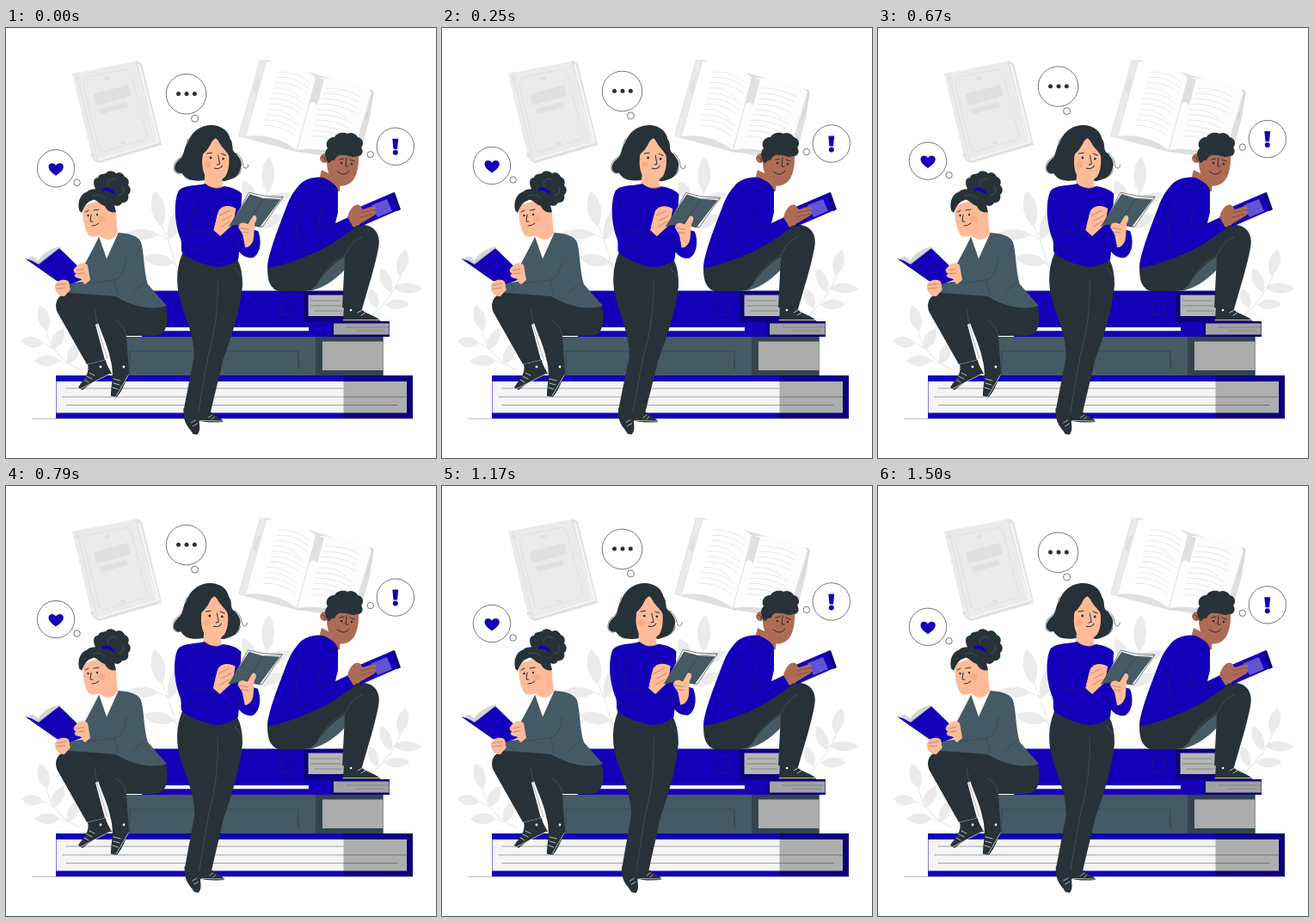
Recreate the animation shown at these times as an HTML page. Size 500 by 500 pixels, loop 1.54 s.

```html
<!DOCTYPE html>
<html lang="en">
<head>
<meta charset="utf-8">
<title>Readers</title>
<style>
html, body { margin: 0; width: 100%; height: 100%; overflow: hidden; background: #fff; }
svg { display: block; width: 100vw; height: 100vh; }
.blue { fill: #1400b8; }
.navy { fill: #0d007c; }
.dark { fill: #263238; }
.slate { fill: #455a64; }
.skin { fill: #ffbb98; }
.brown { fill: #ae6c55; }
.pale { fill: #ebebeb; }
.grey { fill: #e0e0e0; }
.line { fill: none; stroke: #263238; stroke-width: .6; stroke-linecap: round; stroke-linejoin: round; }
.face { fill: none; stroke: #263238; stroke-width: 1; stroke-linecap: round; }
.seam { fill: none; stroke: #56686f; stroke-width: .5; }
.lace { fill: none; stroke: #fff; stroke-width: .9; stroke-linecap: round; }
.rule { fill: none; stroke: #e3e3e3; stroke-width: .8; }
.bubble circle { fill: #fff; stroke: #263238; stroke-width: .65; }
</style>
</head>
<body>
<svg viewBox="0 0 500 500">
  <defs><path id="leaf" d="M0,0C-.62,-.3 -.55,-.75 0,-1C.55,-.75 .62,-.3 0,0Z"/></defs>
  <g id="plants" class="pale"></g>

  <!-- closed book -->
  <path fill="#f4f4f4" d="M77,53L153,38L158,42L181,136L108,157L101,153Z"/>
  <path class="grey" d="M150,39L153,38L158,42L181,136L108,157L102,154L176,134Z"/>
  <path fill="#f6f6f6" d="M153,42L156,43L179,133L109,154L106,153L176,133Z"/>
  <path class="pale" d="M77,53L150,39L174,133L101,154Z"/>
  <path fill="none" stroke="#dcdcdc" stroke-width=".8" d="M82,52L106,153M92,60Q92,57 95,57L141,48Q144,51 146,55L164,125Q164,129 161,130L113,144Q109,142 108,139L90,65Z"/>
  <path class="grey" d="M102,77L142,66L145,79L105,90ZM109,94L140,86L142,92L111,100ZM114,58L120,56L121,60L115,61ZM133,133L138,131L139,135L134,136ZM81,57L85,56L86,60L82,61ZM98,147L102,146L103,150L99,150Z"/>

  <!-- open book -->
  <path class="grey" d="M295,37L303,37L427,73L424,100L410,154L338,144L270,126Z"/>
  <path class="pale" d="M296,37L302,38L278,128L271,126Z"/>
  <path fill="#fff" d="M303,39C326,38 347,46 361,58L338,142C322,129 300,123 279,126Z"/>
  <path fill="#fdfdfd" d="M361,58C382,58 409,63 425,74L402,151C382,143 359,138 338,142Z"/>
  <path fill="none" stroke="#d6d6d6" stroke-width=".8" d="M361,58L338,142M338,144C360,140 381,145 402,152"/>
  <path class="grey" d="M360,57L370,60L362,90L358,86L352,88ZM291,60L296,55L291,77L287,73Z"/>
  <path fill="none" stroke="#cfcfd8" stroke-width="1.2" d="M424,72L427,75L424,90L418,108"/>
  <g id="rules" class="rule"></g>

  <!-- stack of books -->
  <path class="line" stroke-opacity=".6" d="M31,454.3H473"/>
  <path class="blue" d="M58,404H473V454H58Z"/>
  <path fill="#f5f5f5" d="M58.5,411H466V447.5H58.5Z"/>
  <path class="line" d="M70,419H392M66,429H466M70,438.5H455" stroke-opacity=".7"/>
  <path fill-opacity=".29" d="M392.500,404H473V454H392.500Z"/>
  <path class="navy" d="M466,404H473V454H466Z"/>
  <path class="slate" d="M138,359H438.500V404H138Z"/>
  <path fill="#34444c" d="M360,359H438.500V404H360Z"/>
  <path fill="#acacac" d="M368,364.500H438.500V398H368Z"/>
  <path class="line" d="M144,376H340V396M340,385V396M144,376V403" stroke-opacity=".75"/>
  <path class="blue" d="M158,341H378V359H158Z"/>
  <path fill="#f0f0f5" d="M184,348H352V352.300H184Z"/>
  <path class="navy" d="M378,341H446V359H378ZM158,341H378V342H158Z"/>
  <path fill="#a2a2a5" d="M381,343.500H445.500V356.500H381Z"/>
  <path class="line" d="M396,348H445M408,352H440" stroke-opacity=".45"/>
  <path class="blue" d="M170,305.500H346V341H170Z"/>
  <path class="navy" d="M346,305.500H396V341H346Z"/>
  <path fill="#b5b5b5" d="M351.500,310.500H396V335H351.500Z"/>
  <path class="line" d="M355,317H388M355,323H390M359,329H390M319.500,314H333V333.500H319.500Z" stroke-opacity=".6"/>
  <path class="line" d="M187,313V341M346,306V341" stroke-opacity=".5"/>

  <!-- man -->
  <g>
    <path class="slate" d="M352,304L366,281L398,256L394,281Q374,302 352,306Z"/>
    <path class="dark" d="M304,277L352,264C372,242 398,226 417,229C431,231 436,243 433,256C429,278 421,302 414,327L391,325L394,266C381,273 371,284 363,296Q357,306 345,306H317C305,302 304,290 304,277Z"/>
    <path class="seam" d="M394,266C397,256 405,246 414,243M363,296Q372,276 394,264"/>
    <path class="dark" d="M393,322L412,325C416,333 432,334 436,341.500H392Z"/>
    <path class="lace" d="M409,331L414,328M413,334L418,331M392,339.500H434" stroke-opacity=".75"/>
    <circle cx="401" cy="328" r="1.300" fill="#fff"/>
    <path class="brown" d="M367,165L389,176L388,190Q374,190 364,176Z"/>
    <path class="blue" d="M339,185C346,175 360,172 369,174C376,177 383,181 386,188V214L383,227L400,219L406,232C389,245 372,256 357,262C339,270 319,277 304,279C304,264 318,229 328,203Q332,193 339,185Z"/>
    <path class="line" d="M346,202C338,219 335,243 340,255Q343,263 354,261M383,227C374,231 367,234 362,236L366,211M386,190Q377,190 368,176" stroke-opacity=".65"/>
    <path class="brown" d="M376,147C371,144 365,147 365,152C366,157 371,158 373,156C373,166 377,178 385,183C392,185 402,182 406,173C410,164 411,152 409,143L386,136Z"/>
    <path class="dark" d="M375,157C370,151 370,143 374,140C370,133 376,126 382,127C385,121 393,121 397,123C402,120 408,124 409,127C415,128 417,135 413,139C417,144 413,150 408,149C402,152 397,147 392,148C387,146 384,150 382,154Q379,152 376,157Z"/>
    <path class="face" d="M388,153L393,152M400,153L405,155M385,167Q394,174 399,166M396,151L395,161L398,161" stroke-width=".9"/>
    <path class="face" d="M368,150Q372,151 371,155" stroke-width=".5"/>
    <circle class="dark" cx="390" cy="157" r="1.300"/><circle class="dark" cx="402" cy="158" r="1.300"/>
    <path class="blue" d="M402,212L451,191L458,211L412,231Z"/>
    <path class="navy" d="M448,193L452,191L459,211L455,213Z"/>
    <path fill="#6254d2" d="M425,206L443,199L449,213L432,220Z"/>
    <path class="brown" d="M397,220C400,210 405,204 411,206L415,211L427,207C432,208 430,211 426,212C433,212 431,217 425,220C417,225 409,229 404,232Z"/>
    <path class="line" d="M412,215L426,212M412,220L427,216" stroke-opacity=".6"/>
  </g>

  <!-- seated girl -->
  <g>
    <path class="dark" d="M80,305C63,307 54,317 60,331L94,391L115,386L104,345L131,331L128,309Z"/>
    <path class="dark" d="M103,327C102,313 115,309 130,312L181,317C189,326 190,344 183,354Q180,358 170,358H140L142,387L122,388C118,365 106,347 103,327Z"/>
    <path class="seam" d="M103,327L107,350L118,385M128,340Q139,348 140,358"/>
    <path class="dark" d="M95,391L116,386C117,393 121,397 123,402C111,406 100,412 89,421L84,418C88,411 98,403 95,391Z"/>
    <path class="dark" d="M122,387L142,385L143,401C139,412 135,422 129,429L122,428C122,414 126,406 122,387Z"/>
    <path class="lace" d="M97,401L103,404M94,405L100,408M91,409L96,412M125,413L132,415M125,408L133,410M124,418L130,420M86,420L121,402M128,428L142,404" stroke-opacity=".75"/>
    <circle cx="110" cy="394" r="1.400" fill="#fff"/><circle cx="137" cy="394" r="1.400" fill="#fff"/>
    <path class="skin" d="M110,224L127,210L130,239Q121,252 108,241Z"/>
    <path class="slate" d="M108,243L117,269L131,238C143,239 153,241 157,249C161,263 160,283 165,298L187,323C173,328 151,326 127,312L103,310L72,308L73,297L94,294L90,277C97,265 104,251 108,243Z"/>
    <path class="line" d="M140,268C138,280 135,291 126,293L95,297M146,309Q153,302 160,298M126,293L130,310M108,243L117,269L131,238" stroke-opacity=".6"/>
    <path class="skin" d="M90,207C88,218 91,235 97,242C105,245 114,239 118,233C128,230 131,218 126,210L112,199Z"/>
    <path class="dark" d="M85,212C83,202 86,193 95,190C97,187 102,188 104,187C101,181 101,174 107,174C108,169 114,170 116,169C120,164 126,167 128,169C134,166 137,171 138,173C144,175 143,181 142,183C147,187 144,193 142,194C144,201 138,204 135,203C133,208 127,207 126,206L128,214C122,216 116,211 115,207C109,205 104,198 101,200C94,202 91,207 88,215Z"/>
    <path class="blue" d="M112,187C118,183 125,187 127,194L123,192Q118,188 112,190Z"/>
    <path class="seam" d="M119,184C116,177 123,173 129,177M130,195C136,194 139,189 135,184M100,195Q109,192 115,198"/>
    <path class="face" d="M92,214L96,212M102,212L108,211M100,230Q105,230 108,227M99,217L98,225L101,225" stroke-width=".8"/>
    <circle class="dark" cx="95.500" cy="218" r="1.200"/><circle class="dark" cx="106" cy="217" r="1.200"/>
    <path fill="#f58f70" fill-opacity=".35" d="M106,222a5,4 0 1,0 10,0a5,4 0 1,0 -10,0"/>
    <path class="blue" d="M22,268L36,272L62,256L97,290L74,298L59,294Z"/>
    <path fill="#d5d5d5" d="M26,268C34,262 34,270 38,270C42,262 54,255 64,254L61,257L38,275Z"/>
    <path class="line" d="M38,274L63,295M38,274L61,257" stroke-opacity=".55"/>
    <path class="skin" d="M57,299C59,294 66,291 72,294C75,297 73,301 75,304L68,312C62,313 56,307 57,299Z"/>
    <path class="skin" d="M80,279C84,273 92,271 95,276L98,293L92,298C88,297 90,291 84,291C78,289 79,286 82,286C78,284 78,281 80,279Z"/>
    <path class="line" d="M59,299L70,297M59,303L69,302M82,282L91,280M83,286L91,285" stroke-opacity=".55"/>
  </g>

  <!-- standing woman -->
  <g id="woman">
    <path class="dark" d="M207,442L226,448C223,459 229,466 223,473L218,472C215,465 206,462 207,442Z"/>
    <path class="dark" d="M223,447L240,447C244,453 253,453 253,458C243,459 232,459 223,456Z"/>
    <path class="lace" d="M216,459L221,456M218,463L223,460M236,453L240,450M240,455L243,452M227,456.500L252,457" stroke-opacity=".7"/>
    <path class="dark" d="M205,262C197,281 198,301 203,318C210,341 219,359 219,382L207,445L223,450L238,449C243,426 249,404 252,388C263,357 272,330 275,299Q275,280 269,269Z"/>
    <path class="seam" d="M246,292C247,321 244,351 235,383L224,447M266,278Q268,285 275,289"/>
    <path class="dark" d="M240,113C225,112 214,122 210,135C205,142 208,148 201,153C193,160 194,170 204,169C209,177 219,179 230,177L254,178C263,176 271,172 272,164C276,156 270,150 267,146C260,142 265,135 260,129C258,119 250,114 240,113Z"/>
    <path class="line" d="M211,129C207,140 209,147 198,154C192,162 195,172 203,169M205,169Q209,179 219,176M267,145C275,151 274,157 276,162Q281,165 281,159M262,175Q273,172 273,163"/>
    <path class="skin" d="M231,164L251,171L251,187Q240,193 230,184Z"/>
    <path class="blue" d="M231,181C239,187 247,188 253,184C263,185 271,189 274,193L272,229L293,236C298,249 295,263 287,267C279,268 274,264 271,260L270,269C258,278 244,280 233,275Q217,271 206,263C202,259 205,253 203,246C196,229 194,204 200,190C206,182 221,184 231,181Z"/>
    <path class="line" d="M217,203C216,220 213,230 211,234L243,239M203,247Q210,257 233,260M231,181Q240,190 253,184M271,260L272,246M280,251Q289,255 294,251" stroke-opacity=".65"/>
    <path class="skin" d="M230,140C226,151 227,166 232,173C238,180 250,179 255,172C260,164 260,147 256,139L243,128Z"/>
    <path class="dark" d="M241,126C238,136 233,143 228,147L226,165C218,153 226,133 236,122L253,124C260,131 259,142 259,149C255,141 249,139 245,128Z"/>
    <path class="face" d="M233,146L239,145M250,146L255,148M242,163Q248,165 251,160M246,148L248,158L245,159" stroke-width=".9"/>
    <circle class="dark" cx="237.500" cy="151" r="1.400"/><circle class="dark" cx="252" cy="152" r="1.400"/>
    <ellipse cx="234" cy="159" rx="4" ry="3.500" fill="#f58f70" fill-opacity=".35"/>
    <path class="skin" d="M241,235C245,226 244,214 250,209C257,205 264,208 267,210L264,228L249,242Z"/>
    <path fill="#f4f4f4" stroke="#263238" stroke-width=".6" d="M264,223L282,191L300,195L322,196L298,231L278,228Z"/>
    <path class="slate" d="M259,230L283,193L300,198L319,199L295,231L278,228Z"/>
    <path class="line" d="M279,228L300,198L321,197M259,230L278,228L295,231" stroke-opacity=".7"/>
    <path class="skin" d="M247,212C253,206 262,207 267,210L255,221L264,219L258,230L249,237L242,231Z"/>
    <path class="line" d="M248,218L260,212M251,224L262,218M250,231L260,225" stroke-opacity=".55"/>
    <path class="skin" d="M270,232C270,226 276,225 281,228L287,218C291,217 293,221 289,227L288,241C288,248 284,255 278,255L275,240Z"/>
    <path class="line" d="M271,232L282,234M274,237L282,238" stroke-opacity=".55"/>
  </g>

  <!-- thoughts -->
  <g id="thoughts">
    <g class="bubble">
      <circle cx="209.500" cy="77" r="23.300"/><circle cx="219.500" cy="105.500" r="4"/>
      <circle cx="58" cy="163.500" r="21.700"/><circle cx="82.600" cy="180" r="3.700"/>
      <circle cx="452.800" cy="138" r="21.700"/><circle cx="423.800" cy="147.500" r="3.700"/>
    </g>
    <g class="dark"><circle cx="200.500" cy="76.700" r="2.500"/><circle cx="210" cy="76.700" r="2.500"/><circle cx="219.300" cy="76.700" r="2.500"/></g>
    <path class="blue" d="M58,172C54,169 49.500,166 49.500,161.500C49.500,157 55.500,156 58,160C60.500,156 66.800,157 66.800,161.500C66.800,166 62,169 58,172Z"/>
    <path class="blue" d="M449.300,129H456.200L455,141H450.500Z"/><circle class="blue" cx="452.800" cy="145" r="3"/>
  </g>
</svg>
<script>
const LOOP = 1540, STEPS = 37;
const $ = id => document.getElementById(id);

function add(parent, tag, attrs) {
  const el = document.createElementNS('http://www.w3.org/2000/svg', tag);
  for (const k in attrs) el.setAttribute(k, attrs[k]);
  parent.append(el);
}

// Each leaf: base x, base y, length, width, angle from upright.
function plant(stem, leaves) {
  add($('plants'), 'path', { d: stem, fill: 'none', stroke: '#ebebeb', 'stroke-width': 1.2 });
  for (const [x, y, len, wide, turn] of leaves)
    add($('plants'), 'use', { href: '#leaf', transform: `translate(${x} ${y}) rotate(${turn}) scale(${wide} ${len})` });
}

plant('M46,350Q55,385 88,398M42,366L52,371M62,387L72,391', [
  [48, 352, 31, 15, -16], [43, 367, 25, 14, -82], [63, 387, 30, 14, -90],
  [53, 374, 29, 14, 30], [72, 391, 29, 14, 26]]);
plant('M182,230Q193,258 205,300M176,240L190,246M194,272L198,277', [
  [181, 231, 42, 18, -11], [177, 240, 38, 14, -90], [196, 273, 37, 16, -80],
  [189, 247, 45, 17, 22]]);
plant('M304,190L285,260M302,199L297,212M302,224L293,232', [
  [304, 192, 42, 17, 2], [289, 203, 29, 15, -28], [298, 207, 36, 15, 66],
  [291, 232, 35, 15, 66]]);
plant('M460,285Q449,315 424,335M450,302L455,301M440,322L446,322', [
  [457, 288, 31, 15, 15], [450, 302, 34, 13, 92], [440, 322, 29, 13, 88],
  [448, 307, 30, 14, -24], [432, 326, 25, 13, -22]]);

for (let i = 0; i < 11; i++) {
  const x = 316 - i * 1.75, y = 51 + i * 6.2;
  add($('rules'), 'path', { d: `M${x},${y}q22,-1 ${i % 4 == 3 ? 31 : 38},13` });
  const u = 371 - i * 1.9, v = 70 + i * 6.2;
  if (i < 10) add($('rules'), 'path', { d: `M${u},${v}q21,-1 ${i % 5 == 4 ? 32 : 41},10` });
}

function draw(ms) {
  const t = Math.floor((ms % LOOP) / LOOP * STEPS + .1) / STEPS * LOOP;
  const phase = (t + 60) % LOOP / LOOP;
  const lift = .5 - 10 * (1 - Math.abs(2 * phase - 1));
  const sway = .85 * Math.sin(phase * 2 * Math.PI);
  $('thoughts').setAttribute('transform', `translate(0 ${lift.toFixed(2)})`);
  $('woman').setAttribute('transform', `rotate(${sway.toFixed(3)} 240 302)`);
}

const start = performance.now();
function tick() {
  draw(performance.now() - start);
  requestAnimationFrame(tick);
}
draw(0);
requestAnimationFrame(tick);
</script>
</body>
</html>
```
